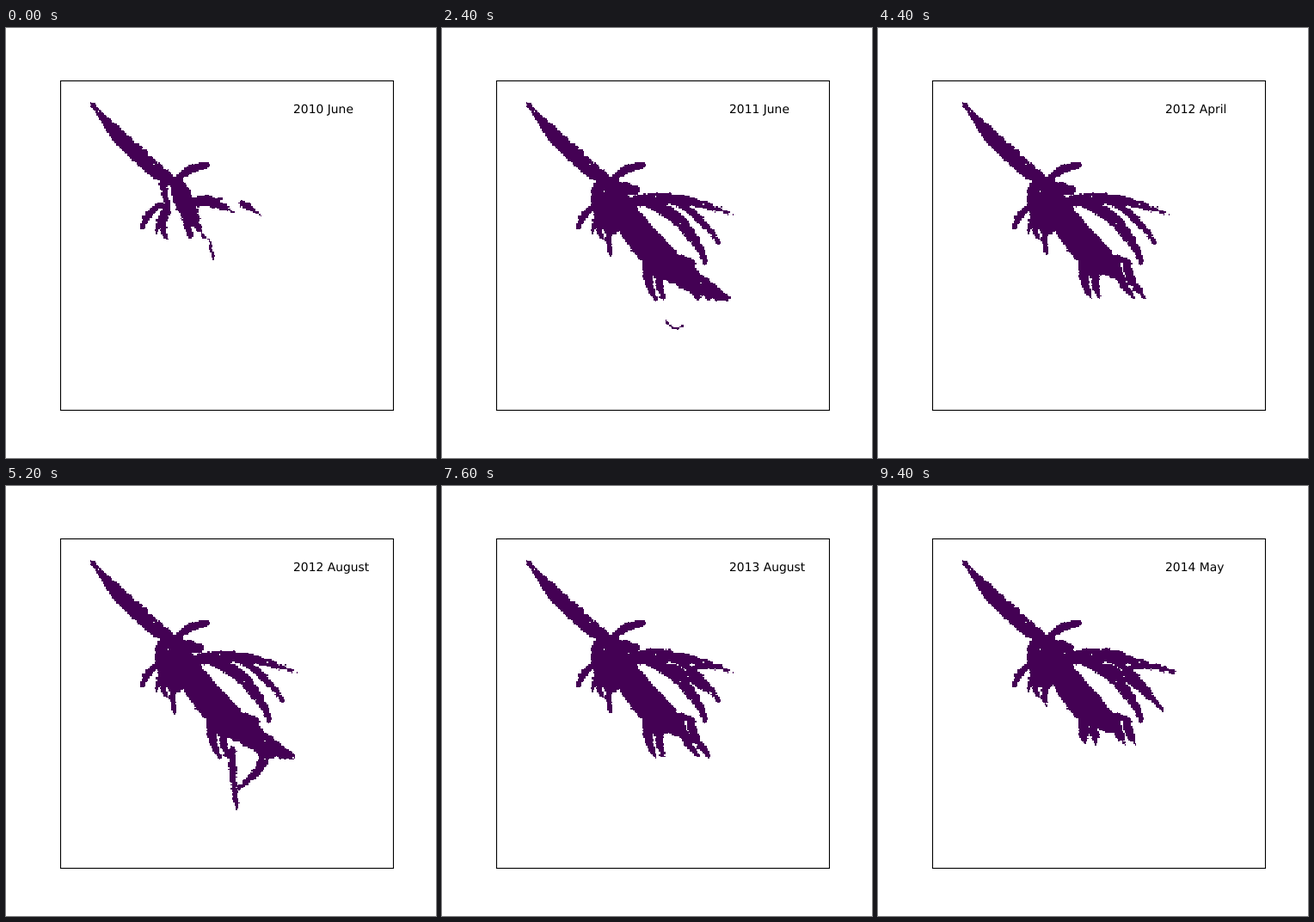
These frames come from a looping animation (500x500 px, 9600 ms). An HTML page with a canvas:

```html
<!DOCTYPE html>
<html lang="en">
<head>
<meta charset="utf-8">
<title>Monthly flood extent</title>
<style>
  html, body { margin: 0; width: 100%; height: 100%; overflow: hidden; background: #fff; }
  canvas, svg { position: absolute; left: 0; top: 0; }
  text { font: 13.89px "DejaVu Sans", sans-serif; text-rendering: geometricPrecision; }
</style>
</head>
<body>
<canvas id="map" width="500" height="500"></canvas>
<svg width="500" height="500">
  <rect x="63.5" y="61.5" width="387" height="383" fill="none" stroke="#000" stroke-width="1.11"/>
  <text id="label" x="334" y="99"></text>
</svg>
<script>
const MONTHS = ['January', 'February', 'March', 'April', 'May', 'June', 'July',
  'August', 'September', 'October', 'November', 'December'];
const STEP = 200, COUNT = 48, CELL = 1.5, SAMPLES = 60;
const ctx = document.getElementById('map').getContext('2d');
const label = document.getElementById('label');

const mix = (a, b, k) => a + (b - a) * k;
const clamp = v => Math.max(0, Math.min(1, v));

// Turning points of the flood, as [month, level].
const tides = [[0, .37], [3, .85], [8, .6], [14, 1.4], [16, 1.2],
  [22, .82], [26, 1.4], [30, .68], [38, .83], [47, .78]];

function floodAt(month) {
  const i = Math.max(1, tides.findIndex(([m]) => m >= month));
  const [m0, l0] = tides[i - 1], [m1, l1] = tides[i];
  return mix(l0, l1, .5 - .5 * Math.cos(Math.PI * (month - m0) / (m1 - m0)));
}

// How far each region fills at a given flood level.
const regions = {
  base:  () => 2,
  rim:   () => 1.15,
  core:  flood => flood,
  hub:   flood => (flood - .56) * 5,
  east:  flood => .35 + (flood - .37) * 2.4,
  late:  (flood, month) => (month - 30) / 10,
  south: flood => (flood - .7) * 9,
  link:  flood => (flood - .55) * 9,
  dots:  flood => (flood - 1.1) * 8,
  far:   flood => (flood - 1.2) * 6
};

// A river is a quadratic curve filling from its start; its radius runs from r0 to r1 plus a belly.
const rivers = [];
function river(region, start, bend, end, r0, r1, belly = 0) {
  const axis = (k, t) => mix(mix(start[k], bend[k], t), mix(bend[k], end[k], t), t);
  rivers.push({
    region,
    at: t => [axis(0, t), axis(1, t), mix(r0, r1, t) + belly * Math.sin(Math.PI * t)]
  });
}
const straight = (region, a, b, r0, r1) =>
  river(region, a, [(a[0] + b[0]) / 2, (a[1] + b[1]) / 2], b, r0, r1);

river('base', [99, 87], [140, 141], [188, 176], 2, 8, 4);
river('base', [181, 178], [186, 198], [188, 216], 4, 3);
straight('base', [207, 212], [214, 241], 6, 3);
straight('base', [213, 215], [231, 243], 4, 1.5);
straight('base', [236, 245], [241, 267], 1, 2);
straight('base', [292, 214], [297, 219], 1, 1);

river('core', [199, 180], [225, 269], [331, 314], 8, 5, 12);
river('hub', [187, 178], [184, 205], [198, 232], 9, 9, 6);
straight('hub', [197, 185], [225, 188], 10, 5);

river('rim', [200, 174], [215, 160], [236, 159], 3, 3, 2);
river('rim', [180, 206], [162, 214], [158, 233], 4, 2.5, 1);
river('rim', [184, 216], [178, 230], [187, 245], 6, 2);
straight('rim', [178, 224], [175, 239], 3, 1.5);
straight('south', [193, 238], [196, 264], 4, 2);

river('east', [212, 204], [270, 188], [338, 217], 6, 1, 3);
river('east', [232, 200], [283, 214], [306, 271], 6, 3, 2.5);
river('east', [275, 204], [300, 218], [321, 249], 4, 2.5, 1);
river('late', [222, 198], [255, 190], [285, 195], 6, 3);
river('late', [290, 212], [315, 204], [344, 217], 3, 2, 1);
river('late', [260, 210], [300, 222], [330, 260], 5, 2, 1.5);

for (const [from, to] of [[237, 248], [250, 257], [277, 298], [289, 311]])
  river('south', [from, 272], [from, 292], [to, 314], 5, 2.5, 1);

river('link', [252, 262], [290, 262], [291, 286], 2.5, 3);
straight('link', [234, 266], [247, 287], 3, 2.5);
river('far', [262, 308], [263, 340], [268, 373], 5, 2.5);
river('far', [302, 312], [292, 338], [270, 350], 6, 2.5);
river('dots', [260, 342], [275, 357], [287, 337], 1, 1);

function hash(i, j) {
  const v = Math.sin(i * 127.1 + j * 311.7) * 43758.5453;
  return v - Math.floor(v);
}

// Ragged shoreline: smooth waves plus per-cell grain.
const rough = (i, j) => Math.sin(i * .7 + 2 * Math.sin(j * .45)) * .5
  + Math.sin(j * .8 + 2 * Math.sin(i * .38)) * .5 + (hash(i, j) - .5) * 1.4;

function fillDisc(x, y, radius) {
  const reach = radius + 2;
  for (let j = Math.floor((y - reach) / CELL); j * CELL < y + reach; j++) {
    for (let i = Math.floor((x - reach) / CELL); i * CELL < x + reach; i++) {
      const distance = Math.hypot((i + .5) * CELL - x, (j + .5) * CELL - y);
      if (distance + rough(i, j) > radius || hash(j, i) > .997) continue;
      const left = Math.round(i * CELL), top = Math.round(j * CELL);
      ctx.fillRect(left, top, Math.round((i + 1) * CELL) - left, Math.round((j + 1) * CELL) - top);
    }
  }
}

function draw(month) {
  ctx.clearRect(0, 0, 500, 500);
  ctx.fillStyle = '#440154';
  const flood = floodAt(month);
  for (const { region, at } of rivers) {
    const level = regions[region](flood, month);
    for (let s = 0; s <= SAMPLES; s++) {
      const [x, y, width] = at(s / SAMPLES);
      const radius = width * clamp((level - s / SAMPLES) * 4);
      if (radius > .4) fillDisc(x, y, radius);
    }
  }
  const n = month + 5;
  label.textContent = `${2010 + Math.floor(n / 12)} ${MONTHS[n % 12]}`;
}

let shown = -1;
function tick() {
  const month = Math.floor(performance.now() / STEP) % COUNT;
  if (month !== shown) draw(shown = month);
  requestAnimationFrame(tick);
}
tick();
</script>
</body>
</html>
```
